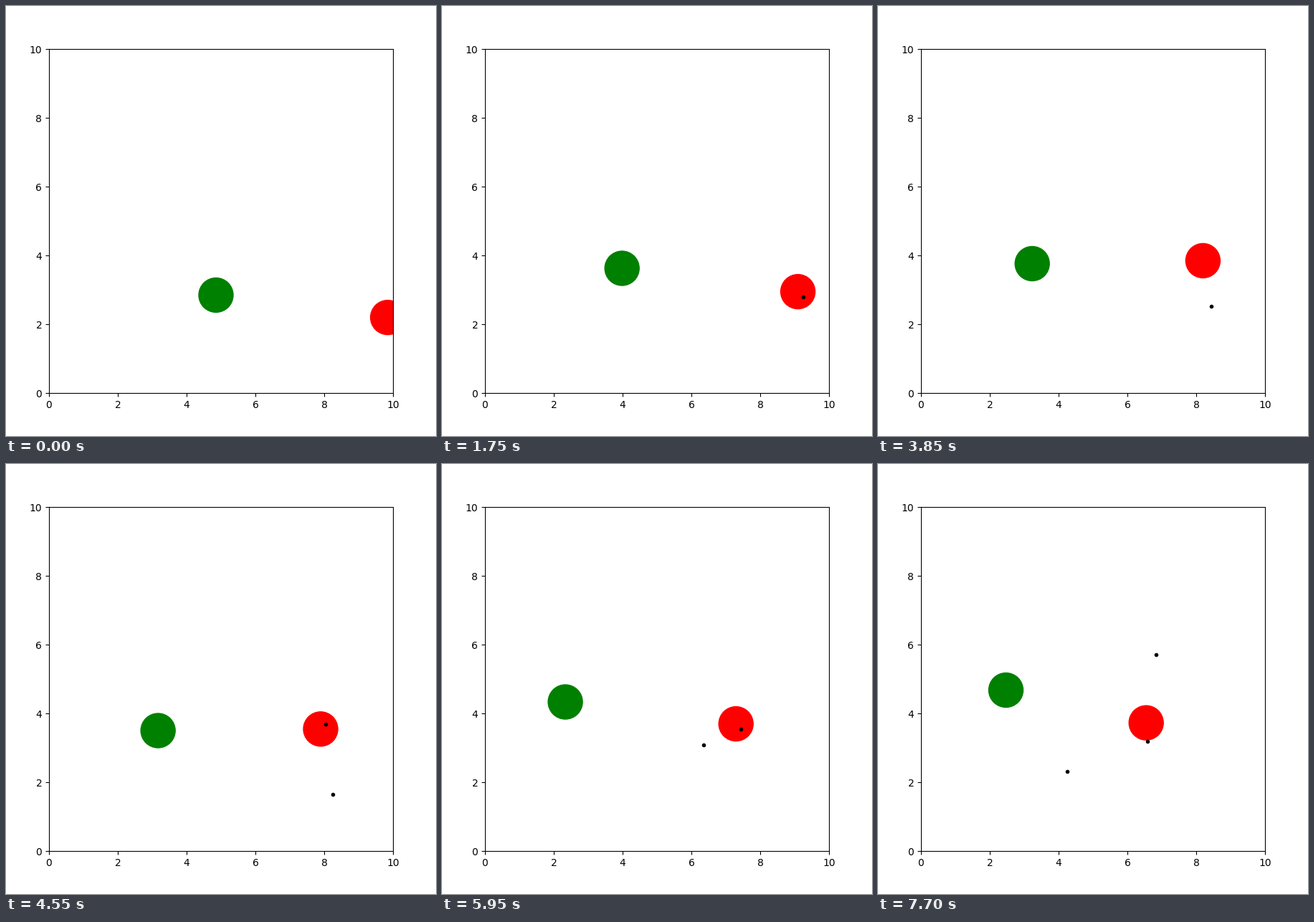
Write a matplotlib script that moves like this. It is 600x600 px and loops after 8 s.

```python
import numpy as np
import matplotlib.pyplot as plt
from matplotlib.animation import FuncAnimation
from matplotlib.patches import Circle

TICK = 50         # ms per drawn frame
HOLD = 7          # drawn frames per simulation step
FRAMES = 160
SIZE = 10
SPEED = 0.15      # hunter's step along each axis
SHOT_SPEED = 3 * SPEED
RELOAD = 4        # steps between shots
HEADINGS = [-32.5, -102.9, 200.1, 105.7, 233.3]

# Runner's waypoints: step, x, y
WANDER = [(0, 4.854, 2.846), (2, 4.44, 3.225), (5, 3.983, 3.625),
          (7, 3.535, 4.044), (9, 3.358, 4.183), (11, 3.233, 3.76),
          (13, 3.17, 3.5), (15, 2.771, 3.833), (17, 2.335, 4.333),
          (19, 2.504, 4.35), (22, 2.469, 4.677)]

# Hunter's turning points: step, climb in units of SPEED
CLIMB = [(0, 0), (11, 11), (14, 8), (15, 8), (18, 11), (20, 9), (22, 10.2)]


def follow(points, step):
    """Linear path through (step, value, ...) key points."""
    times, *tracks = zip(*points)
    return [np.interp(step, times, track) for track in tracks]


def hunter(step):
    climb, = follow(CLIMB, step)
    return np.array([9.846 - SPEED * step, 2.196 + SPEED * climb])


def shots(step):
    """Positions of the shots that are still inside the field."""
    points = []
    for i, heading in enumerate(np.radians(HEADINGS)):
        start = RELOAD * (i + 1)
        age = step - start - 1
        move = np.array([np.cos(heading), np.sin(heading)])
        pos = hunter(start) + age * SHOT_SPEED * move
        if age >= 0 and np.all((pos >= 0) & (pos <= SIZE)):
            points.append(pos)
    return np.reshape(points, (-1, 2))


fig = plt.figure(figsize=(6, 6), dpi=100)
ax = fig.add_axes([0.1, 0.1, 0.8, 0.8])
ticks = range(0, SIZE + 1, 2)
ax.set(xlim=(0, SIZE), ylim=(0, SIZE), xticks=ticks, yticks=ticks)

green = ax.add_patch(Circle((0, 0), 0.5, color="green"))
red = ax.add_patch(Circle((0, 0), 0.5, color="red"))
dots, = ax.plot([], [], "k.")


def update(frame):
    step = frame // HOLD
    green.center = follow(WANDER, step)
    red.center = hunter(step)
    dots.set_data(*shots(step).T)
    return green, red, dots


anim = FuncAnimation(fig, update, frames=FRAMES, interval=TICK,
                     repeat=True, repeat_delay=0)
plt.show()
```
